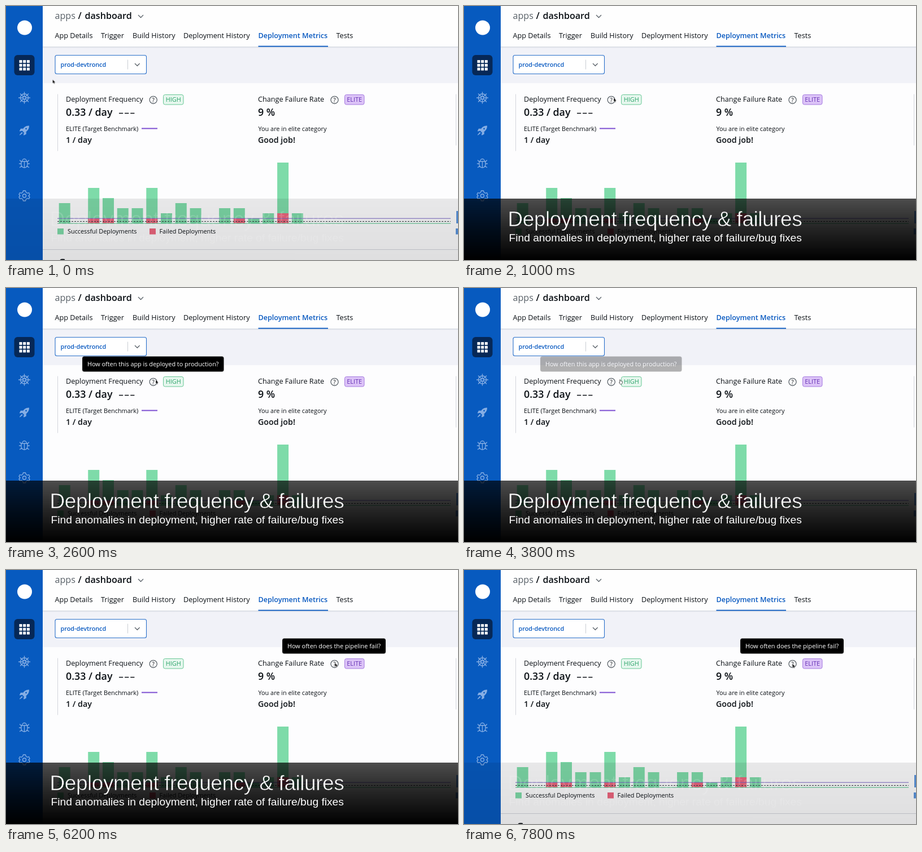
These frames come from a looping animation (800x451 px, 8 s). An HTML page:

```html
<!DOCTYPE html>
<html lang="en">
<head>
<meta charset="utf-8">
<title>Deployment metrics</title>
<style>
  html, body { margin: 0; width: 100%; height: 100%; overflow: hidden; background: #fdfdfe; }
  svg { display: block; width: 100vw; height: 100vh; }
  text { font-family: "Open Sans", sans-serif; font-size: 10.87px; fill: #0a0f14; white-space: pre; }
  .semi { font-weight: 600; }
  .crumb { font-size: 16.1px; }
  .label { font-size: 12.65px; }
  .value { font-size: 17.8px; }
  .goal { font-size: 14.25px; }
  .mid { text-anchor: middle; }
  .icon { fill: none; stroke: #86aee4; stroke-width: 1.3; stroke-linecap: round; stroke-linejoin: round; }
  .chevron { fill: none; stroke: #596168; stroke-width: 1.3; }
  .tip rect { stroke: #8a8a8a; stroke-opacity: .5; stroke-width: .6; }
  .tip text { fill: #fff; }
  .caption text, .trim { font-family: "Liberation Sans", Arial, sans-serif; fill: #fff; }
  .caption .title, .trim { font-size: 37px; letter-spacing: -.45px; }
  .caption .subtitle { font-size: 19.2px; }
  .trim { fill: none; stroke: #000; stroke-width: .6; }

  .band, .words, .tip, .arrow, .hand { animation: 8s step-end infinite; }
  .band { animation-name: band; }
  .words { animation-name: words; }
  .tip.first { animation-name: tip-first; }
  .tip.second { animation-name: tip-second; }
  .arrow { animation-name: arrow; }
  .hand { animation-name: hand; }
  .pointer { animation: travel 8s linear infinite; }

  @keyframes band {
    0% { opacity: .12; } 2.5% { opacity: .45; } 5% { opacity: .85; }
    7.5% { opacity: 1; } 95% { opacity: .5; } 97.5%, 100% { opacity: .12; }
  }
  @keyframes words {
    0% { opacity: .15; } 2.5% { opacity: .6; } 5% { opacity: 1; }
    95% { opacity: .55; } 97.5%, 100% { opacity: .15; }
  }
  @keyframes tip-first {
    0% { opacity: 0; } 15% { opacity: .4; } 17.5% { opacity: 1; }
    47.5% { opacity: .3; } 50%, 100% { opacity: 0; }
  }
  @keyframes tip-second {
    0% { opacity: 0; } 65% { opacity: .28; } 67.5%, 100% { opacity: 1; }
  }
  @keyframes arrow {
    0% { opacity: 1; } 47.5% { opacity: 0; } 50%, 100% { opacity: 1; }
  }
  @keyframes hand {
    0% { opacity: 0; } 47.5% { opacity: 1; } 50%, 100% { opacity: 0; }
  }
  @keyframes travel {
    0% { transform: translate(82.5px, 130.5px); animation-timing-function: steps(2); }
    5% { transform: translate(283.5px, 132.5px); animation-timing-function: steps(3); }
    12.5%, 45% { transform: translate(265px, 163px); animation-timing-function: steps(1); }
    47.5% { transform: translate(275px, 162.5px); animation-timing-function: steps(6); }
    62.5%, 70% { transform: translate(584.5px, 160px); animation-timing-function: steps(4); }
    80%, 100% { transform: translate(581.5px, 166.5px); }
  }
</style>
</head>
<body>
<svg viewBox="0 0 800 451" preserveAspectRatio="none">
  <defs>
    <linearGradient id="shade" x2="0" y2="1">
      <stop offset="0" stop-opacity=".7"/>
      <stop offset=".5" stop-opacity=".86"/>
      <stop offset="1"/>
    </linearGradient>
    <linearGradient id="drop" x2="0" y2="1">
      <stop offset="0" stop-color="#d3d7df"/>
      <stop offset="1" stop-color="#f1f2f8"/>
    </linearGradient>
    <!-- Trims the glyph edges for a light weight -->
    <mask id="thin" maskUnits="userSpaceOnUse" x="0" y="342" width="800" height="109">
      <rect y="342" width="800" height="109" fill="#fff"/>
      <text class="trim" x="77.500" y="390.500">Deployment frequency &amp; failures</text>
    </mask>
    <g id="help">
      <circle r="6.6" fill="none" stroke="#3b444c" stroke-width="1.1"/>
      <text class="mid" y="3.7" style="font-size:10px">?</text>
    </g>
  </defs>

  <rect width="800" height="451" fill="#fdfdfe"/>
  <rect x="65" y="72" width="735" height="65" fill="#f1f2f8"/>
  <rect x="65" y="72" width="735" height="3" fill="url(#drop)"/>
  <rect x="65" width="735" height="72" fill="#fefefe"/>

  <!-- Sidebar -->
  <rect width="65" height="451" fill="#075abf"/>
  <circle cx="33" cy="38.500" r="13" fill="#fff"/>
  <rect x="14.500" y="87" width="36" height="36" rx="6" fill="#062857"/>
  <g id="grid" fill="#fff"></g>
  <g class="icon">
    <g id="sun" transform="translate(32.500 163)"><circle r="7"/><circle r="2.500"/></g>
    <g transform="translate(32.500 221) scale(.88)">
      <path d="M9-9C3-9-1-6-4 0L0 4C6 1 9-3 9-9Z" fill="#86aee4"/>
      <path d="M-3-3l-4 0l-2 4l5-1M3 3v4l-4 2l1-5M-5 4l-4 5l5-4" fill="#86aee4"/>
      <circle cx="3.500" cy="-3.500" r="1.500" fill="#075abf" stroke="none"/>
    </g>
    <g transform="translate(32.500 279)">
      <path d="M-5.500-3H5.500V3a5.500 5 0 0 1-11 0ZM-4-3a4 4.500 0 0 1 8 0M0-3V8M-5.500 1H-9M5.500 1H9M-5-2l-3-3M5-2l3-3M-4.500 5l-3.500 2.500M4.500 5l3.500 2.500"/>
    </g>
    <g transform="translate(32.500 337)">
      <path d="M-2-9H2L3-6L5.500-4.700L8-5.500L9.500-2L7.500 0L9.500 2.500L8 5.500L5.500 4.700L3 6L2 9H-2L-3 6L-5.500 4.700L-8 5.500L-9.500 2L-7.500 0L-9.500-2.500L-8-5.500L-5.500-4.700L-3-6Z"/>
      <circle r="3"/>
    </g>
  </g>

  <!-- Header -->
  <text class="crumb" x="86.500" y="23" style="fill:#596168">apps</text>
  <text class="crumb semi" x="127.500" y="23">/</text>
  <text class="crumb semi" x="139.500" y="23">dashboard</text>
  <path class="chevron" d="M234 16l4.500 4.500l4.500-4.500"/>
  <g id="tabs"></g>
  <text class="semi" x="446.500" y="57" style="font-size:12.6px;fill:#0758c0">Deployment Metrics</text>
  <rect x="446.500" y="70.700" width="123.500" height="1.800" fill="#0758c0"/>

  <!-- Environment picker -->
  <rect x="87" y="87.500" width="161.500" height="33" rx="3" fill="#fff" stroke="#2a70ca" stroke-width="1.100"/>
  <text class="semi" x="96.500" y="107.700" style="font-size:10.8px;fill:#0758c0">prod-devtroncd</text>
  <path d="M215.500 95.500v17" stroke="#c9ced4"/>
  <path class="chevron" d="M228 102l4.300 4.300l4.300-4.300"/>

  <!-- Metrics -->
  <path d="M91.500 156.500v101M796.500 156.500v91" stroke="#d3d6dc"/>
  <text class="label" x="106" y="170">Deployment Frequency</text>
  <use href="#help" x="260.700" y="166.800"/>
  <rect x="278.500" y="157.500" width="35.500" height="17.500" rx="3" fill="#e6f7ee" stroke="#67c795"/>
  <text class="mid" x="296.200" y="170.300" style="fill:#2ba36a">HIGH</text>
  <text class="value semi" x="106" y="194.500">0.33 / day</text>
  <path d="M200 190.500h27.500" stroke="#0a0f14" stroke-width="1.600" stroke-dasharray="7.200 2.900"/>
  <text x="106" y="221.500">ELITE (Target Benchmark)</text>
  <path d="M240 217.500h28" stroke="#7d4fd1" stroke-width="2"/>
  <text class="goal semi" x="106" y="242.700">1 / day</text>

  <text class="label" x="446" y="170">Change Failure Rate</text>
  <use href="#help" x="581.500" y="166.800"/>
  <rect x="599.500" y="157.500" width="34.500" height="17.500" rx="3" fill="#dcc3f7" stroke="#a57be0"/>
  <text class="mid" x="616.700" y="170.300" style="fill:#6633b5">ELITE</text>
  <text class="value semi" x="446" y="194.500">9 %</text>
  <text x="446.500" y="221.500">You are in elite category</text>
  <text class="goal semi" x="446" y="242.700">Good job!</text>

  <!-- Chart -->
  <g id="bars"></g>
  <path d="M91 377.200H787" stroke="#7764c4"/>
  <path d="M91 382.500H787" stroke="#29323a" stroke-dasharray="3 2"/>
  <path d="M91 386H787" stroke="#48bf86" stroke-width="1.200"/>
  <rect x="91" y="395" width="11" height="10.500" fill="#7edba9"/>
  <text x="109" y="404">Successful Deployments</text>
  <rect x="254" y="395" width="11" height="10.500" fill="#ee667e"/>
  <text x="271.500" y="404">Failed Deployments</text>
  <path d="M797 364h3v22h-3zM796 395h4v10.500h-4z" fill="#5a94dc"/>
  <path d="M65 432.500H800" stroke="#d3d6db"/>
  <path d="M96 451q4-2 8-.5" fill="none" stroke="#0a0f14" stroke-width="1.600"/>

  <!-- Caption -->
  <g class="caption">
    <rect class="band" y="342" width="800" height="109" fill="url(#shade)"/>
    <g class="words">
      <text class="title" x="77.500" y="390.500" mask="url(#thin)">Deployment frequency &amp; failures</text>
      <text class="subtitle" x="79.500" y="418">Find anomalies in deployment, higher rate of failure/bug fixes</text>
    </g>
  </g>

  <g class="tip first">
    <rect x="135" y="121.500" width="250.500" height="27" rx="3.500"/>
    <text class="mid" x="260.200" y="139">How often this app is deployed to production?</text>
  </g>
  <g class="tip second">
    <rect x="489" y="121.500" width="183" height="27" rx="3.500"/>
    <text class="mid" x="580.500" y="139">How often does the pipeline fail?</text>
  </g>

  <g class="pointer">
    <path class="arrow" d="M0 0V7L1.600 5.600L2.700 8L3.900 7.400L2.900 5.200H5Z" fill="#000" stroke="#fff" stroke-width=".5"/>
    <path class="hand" d="M1 0l1.300 2.500l3 .8v3l-1.300 2h-2.500l-2-3l1 0z" fill="#fff" stroke="#111" stroke-width=".7"/>
  </g>
</svg>
<script>
  const $ = id => document.getElementById(id);

  function add(parent, tag, attrs, content = '') {
    const node = document.createElementNS('http://www.w3.org/2000/svg', tag);
    for (const key in attrs) node.setAttribute(key, attrs[key]);
    node.textContent = content;
    parent.append(node);
  }

  const tabs = { 'App Details': 86.5, 'Trigger': 168, 'Build History': 224, 'Deployment History': 314, 'Tests': 584.5 };
  for (const name in tabs) add($('tabs'), 'text', { class: 'label', x: tabs[name], y: 57 }, name);

  for (let i = 0; i < 9; i++) {
    add($('grid'), 'rect', { x: 23.5 + i % 3 * 6.7, y: 96 + Math.floor(i / 3) * 6.7, width: 5, height: 5, rx: .5 });
  }

  for (let i = 0; i < 8; i++) {
    add($('sun'), 'path', { d: 'M0-7V-10M0-2.5V-7', transform: `rotate(${i * 45})` });
  }

  const totals = [4, 0, 7, 5, 3, 3, 7, 2, 4, 3, 0, 3, 3, 1, 2, 12, 2];
  const failed = { 2: 1, 3: 1, 6: 1, 12: 1, 15: 2 };
  const unit = 9, base = 386;
  function bar(i, count, fill) {
    add($('bars'), 'rect', { x: 93.7 + i * 25.76, y: base - count * unit, width: 20, height: count * unit, fill });
  }
  totals.forEach((count, i) => {
    bar(i, count, '#7edba9');
    if (failed[i]) bar(i, failed[i], '#ee667e');
  });
</script>
</body>
</html>
```
